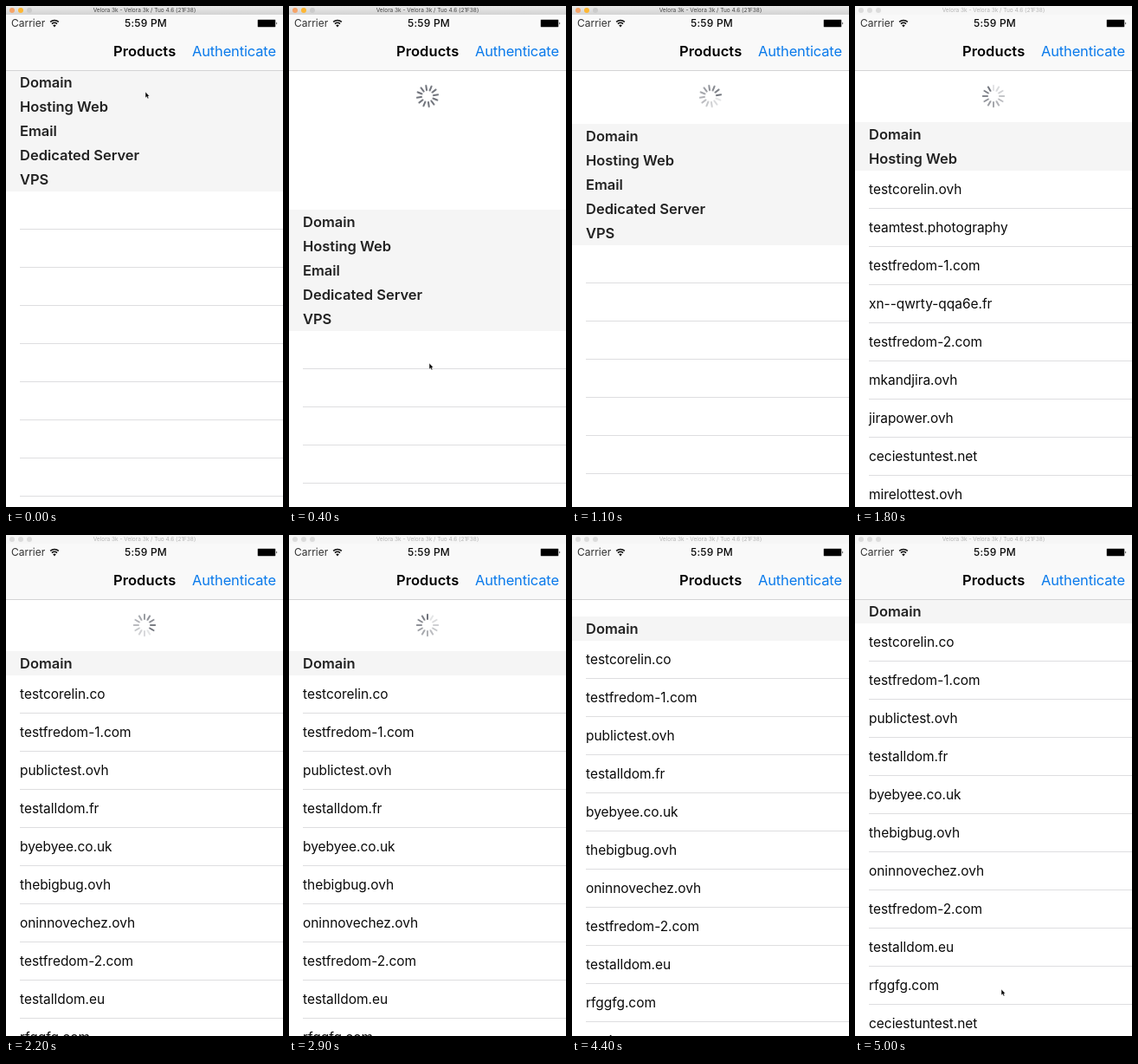
An HTML page that plays this animation: 320 by 578 pixels, repeating every 5.1 s.

```html
<!DOCTYPE html>
<html lang="en">
<head>
<meta charset="utf-8">
<title>Products</title>
<style>
:root { --loop: 5100ms; }
html, body { margin: 0; width: 100%; height: 100%; overflow: hidden; background: #fff; }
#stage {
  position: absolute; left: 0; top: 0; width: 320px; height: 578px; overflow: hidden;
  background: #fff; color: #0a0a0a;
  font-family: Inter, Roboto, sans-serif; font-optical-sizing: none; white-space: nowrap;
}
#stage > *, .titlebar > *, .nav > * { position: absolute; }

/* window title bar */
.titlebar {
  left: 0; top: 0; width: 320px; height: 10px;
  font-size: 6.5px; line-height: 10px; text-align: center;
  background: linear-gradient(#e9e9e9, #d3d3d3); color: #444;
}
.titlebar span { left: 0; width: 100%; }
.titlebar i { top: 2px; width: 6px; height: 6px; border-radius: 50%; background: #dcdcdc; }
.titlebar i:nth-of-type(1) { left: 4px; }
.titlebar i:nth-of-type(2) { left: 14px; }
.titlebar i:nth-of-type(3) { left: 24px; }
.active i:nth-of-type(1) { background: #f6a469; }
.active i:nth-of-type(2) { background: #fdb733; }
.active i:nth-of-type(3) { background: #cbcbcb; }
.idle { background: #f6f6f6; color: #b4b4b4; }
.active { animation: active var(--loop) step-end infinite; }

/* status and navigation bars */
.nav { left: 0; top: 10px; width: 320px; height: 64px; background: #f9f9f9; border-bottom: 1px solid #d4d4d5; }
.status { top: 2px; font-size: 12px; line-height: 16px; }
.carrier { left: 6px; color: #333; }
.clock { left: 0; width: 323px; text-align: center; font-weight: 500; letter-spacing: .2px; }
.nav h1, .nav b { top: 32px; margin: 0; font-size: 16.5px; line-height: 20px; }
.nav h1 { left: 124px; font-weight: 600; letter-spacing: .08px; color: #000; }
.nav b { left: 215px; font-weight: 400; letter-spacing: -.16px; color: #0a7aeb; }
.nav svg { left: 0; top: 0; }

/* table */
#scroll { left: 0; top: 74px; width: 320px; height: 700px; background: #fff; animation: scroll var(--loop) step-end infinite; }
.list { position: absolute; left: 0; top: 0; width: 320px; }
.list h2 {
  margin: 0; padding-left: 16px; height: 28px; background: #f5f5f5; color: #222;
  font-size: 16.5px; font-weight: 600; line-height: 28px; letter-spacing: -.02px;
}
.list p {
  margin: 0 0 0 16px; height: 43px; border-bottom: 1px solid #dedee0;
  font-size: 15.5px; line-height: 44px; letter-spacing: -.04px;
}
#empty { animation: empty var(--loop) step-end infinite; }
#hosting { animation: hosting var(--loop) step-end infinite; }
#domains { animation: domains var(--loop) step-end infinite; }

/* refresh wheel */
#wheels { left: 145px; top: 89px; }
#wheels line { stroke: #70737b; stroke-width: 2; stroke-linecap: round; }
#pull { animation: pull var(--loop) step-end infinite; }
#pull line { animation: tick var(--loop) step-end infinite; }
#spin { animation: spin var(--loop) step-end infinite; }
#spin line { animation: fade 1020ms steps(12) infinite; }

#cursor { left: 0; top: 0; animation: cursor var(--loop) step-end infinite; }

@keyframes active { 0% { visibility: visible } 29.41%, 100% { visibility: hidden } }
@keyframes empty { 0% { visibility: visible } 33.33%, 100% { visibility: hidden } }
@keyframes hosting { 0% { visibility: hidden } 33.33% { visibility: visible } 43.13%, 100% { visibility: hidden } }
@keyframes domains { 0% { visibility: hidden } 43.13%, 100% { visibility: visible } }
@keyframes pull { 0% { visibility: visible } 9.8%, 100% { visibility: hidden } }
@keyframes tick { 0% { opacity: 0 } 2.5%, 100% { opacity: 1 } }
@keyframes fade { from { opacity: 1 } to { opacity: .12 } }
@keyframes spin {
  0% { visibility: hidden; transform: rotate(-8deg) }
  9.8% { visibility: visible; transform: rotate(-8deg) }
  25.49% { visibility: visible; transform: none }
  84.31%, 100% { visibility: hidden; transform: none }
}
@keyframes scroll {
  0% { transform: none }
  1.96% { transform: translateY(22px) }
  3.92% { transform: translateY(72px) }
  5.88% { transform: translateY(125px) }
  7.84% { transform: translateY(161px) }
  9.8% { transform: translateY(172px) }
  13.72% { transform: translateY(152px) }
  15.68% { transform: translateY(105px) }
  17.64% { transform: translateY(78px) }
  19.6% { transform: translateY(66px) }
  21.56% { transform: translateY(62px) }
  23.52% { transform: translateY(60px) }
  84.31% { transform: translateY(49px) }
  86.27% { transform: translateY(20px) }
  88.23% { transform: translateY(4px) }
  90.19%, 100% { transform: none }
}
@keyframes cursor {
  0% { visibility: visible; transform: translate(161px, 99px) }
  1.96% { visibility: visible; transform: translate(161px, 140px) }
  3.92% { visibility: visible; transform: translate(161px, 238px) }
  5.88% { visibility: visible; transform: translate(162px, 343px) }
  7.84% { visibility: visible; transform: translate(162px, 412px) }
  9.8% { visibility: visible; transform: translate(162px, 434px) }
  13.72% { visibility: hidden; transform: translate(162px, 434px) }
  94.11% { visibility: visible; transform: translate(169px, 541px) }
  96.07% { visibility: visible; transform: translate(169px, 532px) }
  98.03%, 100% { visibility: visible; transform: translate(169px, 524px) }
}
</style>
</head>
<body>
<div id="stage">
  <svg id="wheels" width="30" height="30" viewBox="-15 -15 30 30"><g id="pull" transform="rotate(-8)"></g><g id="spin"></g></svg>
  <div id="scroll">
    <div class="list" id="empty"></div>
    <div class="list" id="hosting"></div>
    <div class="list" id="domains"></div>
  </div>
  <div class="nav">
    <span class="status carrier">Carrier</span>
    <span class="status clock">5:59 PM</span>
    <svg width="320" height="30" fill="none" stroke="#111">
      <path d="M51.2 8.4a7 7 0 0 1 9.6 0M53 10.6a4.4 4.4 0 0 1 6 0" stroke-width="1.6"/>
      <path d="M54.2 12.3a2.6 2.6 0 0 1 3.6 0L56 14.4z" fill="#111" stroke="none"/>
      <rect x="290.5" y="5.5" width="21" height="9" rx="1.5" stroke="#999" stroke-width=".6"/>
      <path d="M291 6h20v8h-20zM312.4 8.4q1.8 1.6 0 3.2z" fill="#000" stroke="none"/>
    </svg>
    <h1>Products</h1>
    <b>Authenticate</b>
  </div>
  <div class="titlebar idle"><i></i><i></i><i></i><span>Velora 3k - Velora 3k / Tuo 4.6 (21F38)</span></div>
  <div class="titlebar active"><i></i><i></i><i></i><span>Velora 3k - Velora 3k / Tuo 4.6 (21F38)</span></div>
  <svg id="cursor" width="8" height="11"><path d="M.1.3v6.4l1.5-1.3 1 2.3 1.2-.5-1-2.2h1.8z" fill="#000" stroke="#fff" stroke-width=".3"/></svg>
</div>
<script>
const $ = id => document.getElementById(id);

function fill(id, heads, rows) {
  const add = (tag, text) => {
    $(id).appendChild(document.createElement(tag)).textContent = text;
  };
  heads.forEach(h => add('h2', h));
  rows.forEach(r => add('p', r));
}

fill('empty', ['Domain', 'Hosting Web', 'Email', 'Dedicated Server', 'VPS'], Array(11).fill(''));
fill('hosting', ['Domain', 'Hosting Web'], [
  'testcorelin.ovh', 'teamtest.photography', 'testfredom-1.com', 'xn--qwrty-qqa6e.fr',
  'testfredom-2.com', 'mkandjira.ovh', 'jirapower.ovh', 'ceciestuntest.net', 'mirelottest.ovh'
]);
fill('domains', ['Domain'], [
  'testcorelin.co', 'testfredom-1.com', 'publictest.ovh', 'testalldom.fr', 'byebyee.co.uk',
  'thebigbug.ovh', 'oninnovechez.ovh', 'testfredom-2.com', 'testalldom.eu', 'rfggfg.com',
  'ceciestuntest.net'
]);

// Twelve spokes; the delay of each sets its place in the cycle.
function wheel(id, delay) {
  for (let k = 0; k < 12; k++) {
    const spoke = document.createElementNS('http://www.w3.org/2000/svg', 'line');
    spoke.setAttribute('y1', -7);
    spoke.setAttribute('y2', -12.3);
    spoke.setAttribute('transform', `rotate(${k * 30})`);
    spoke.style.animationDelay = delay(k) + 'ms';
    $(id).appendChild(spoke);
  }
}
wheel('pull', k => k * 20 - 5100);
wheel('spin', k => (k - 11.6) * 1020 / 12 - 240);
</script>
</body>
</html>
```
